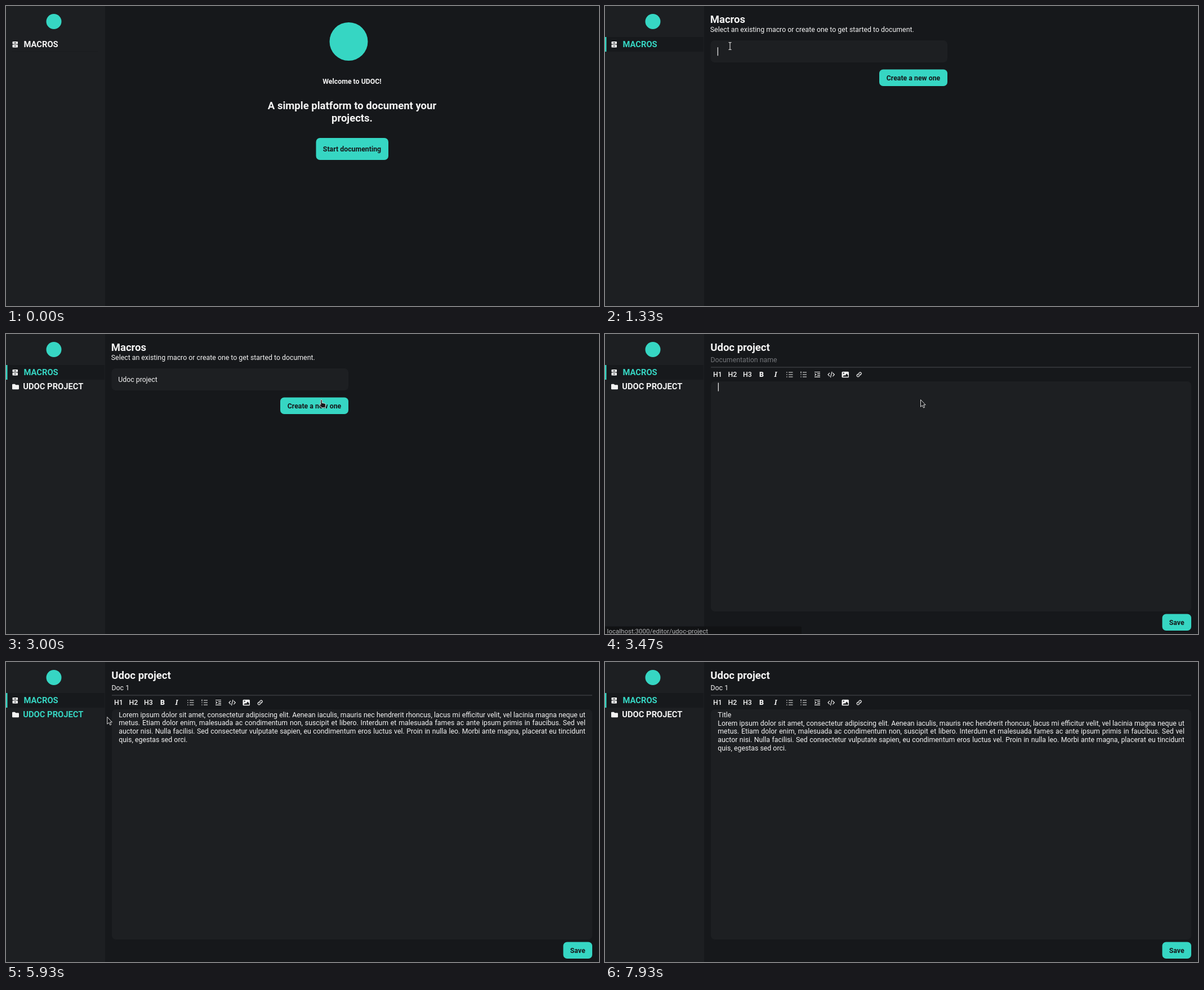
An HTML page for the animation above (8 s loop, 1053x532 px).

```html
<!DOCTYPE html>
<html lang="en">
<head>
<meta charset="utf-8">
<title>Documentation editor</title>
<style>
  :root { --main: #16181b; --panel: #1d1f22; --teal: #36d6c3; }
  html, body { margin: 0; width: 100%; height: 100%; overflow: hidden; background: var(--main); }
  svg { display: block; width: 100vw; height: 100vh; }
  text, .lorem { font: 12.33px Roboto, sans-serif; fill: #f4f4f4; color: #f4f4f4; white-space: pre; }
  .bold { font-weight: 700; }
  .nav { font-weight: 700; font-size: 14.75px; }
  .head { font-weight: 700; font-size: 18.5px; }
  .mid { text-anchor: middle; }
  .teal { fill: var(--teal); }
  .label { font-weight: 700; text-anchor: middle; fill: #16181b; }
  .panel { fill: var(--panel); }
  .hint { fill: #74767a; }
  .tool { text-anchor: middle; font-weight: 500; }
  .line { fill: none; stroke: #f0f0f0; stroke-width: 1.2; }
  .lorem div { white-space: nowrap; line-height: 14.8px; text-align: justify; text-align-last: justify; }
  .lorem div:last-child { text-align-last: left; }
  #status text { font-size: 11.55px; fill: #b4b5b7; }
  .pointer { fill: #17181b; stroke: #dcdcdc; stroke-width: 1; stroke-linejoin: round; }
  #ibeam { fill: none; stroke: #d4d4d4; stroke-width: 1.2; }
</style>
</head>
<body>
<svg viewBox="0 0 1053 532">
  <rect width="1053" height="532" fill="#16181b"/>

  <g id="sidebar">
    <rect class="panel" width="176" height="532"/>
    <circle class="teal" cx="85" cy="27.5" r="13.5"/>
    <path d="M11 80.5H163" stroke="#191b1e"/>
    <g id="active">
      <rect y="55" width="175" height="26" fill="#17191c"/>
      <rect class="teal" y="55" width="2.5" height="26"/>
    </g>
    <g fill="#f4f4f4">
      <rect x="11.5" y="63" width="9.5" height="4.6" rx="1"/>
      <rect x="11.5" y="68.6" width="9.5" height="4.8" rx="1"/>
    </g>
    <path d="M14.5 65.3h3.5M14.5 71h3.5" stroke="#1d1f22" stroke-width="1.2"/>
    <text id="macros" class="nav" x="31.5" y="73.1">MACROS</text>
    <g id="project">
      <path fill="#f4f4f4" d="M12.2 88.7h3.6l1.5 1.6h4.5q1.2 0 1.2 1.2v5.6q0 1.2-1.2 1.2h-9.6q-1.2 0-1.2-1.2v-7.2q0-1.2 1.2-1.2z"/>
      <text id="projectName" class="nav" x="30.3" y="98.3">UDOC PROJECT</text>
    </g>
  </g>

  <g id="welcome">
    <circle class="teal" cx="608.5" cy="63" r="34"/>
    <text class="bold mid" x="614.5" y="138">Welcome to UDOC!</text>
    <text class="head mid" x="614.5" y="183.3">A simple platform to document your</text>
    <text class="head mid" x="614.5" y="205.2">projects.</text>
    <rect class="teal" x="550.5" y="234" width="128.5" height="39" rx="7"/>
    <text class="label" x="614.5" y="258">Start documenting</text>
  </g>

  <g id="create">
    <text class="head" x="186.8" y="29.5">Macros</text>
    <text x="186.8" y="45.7">Select an existing macro or create one to get started to document.</text>
    <rect class="panel" x="187.5" y="61" width="420.5" height="39" rx="7"/>
    <text id="macroInput" x="199.3" y="84.9"></text>
    <rect class="teal" x="487" y="112.5" width="121" height="29.5" rx="7"/>
    <text class="label" x="547.5" y="132.2">Create a new one</text>
  </g>

  <g id="editor">
    <text class="head" x="187.3" y="29.5">Udoc project</text>
    <text id="hint" class="hint" x="187.5" y="50.4">Documentation name</text>
    <text id="docName" x="187.5" y="50.4"></text>
    <path d="M188 59H1041" stroke="#4b4d50"/>
    <text class="tool" x="199.8" y="75.6">H1</text>
    <text class="tool" x="226.3" y="75.6">H2</text>
    <text class="tool" x="253" y="75.6">H3</text>
    <text class="tool" style="font-weight:900" x="278" y="76">B</text>
    <text class="tool" style="font:italic 700 12px 'Noto Serif',serif" x="303" y="76">I</text>
    <g class="line">
      <path d="M326 68h7.5M326 72h7.5M326 76h7.5M322 68h1.8M322 72h1.8M322 76h1.8"/>
      <path d="M351 68h7M351 72h7M351 76h7M348 66.5v3M347.2 72h1.6M347.2 76h1.6"/>
      <path d="M372 67.5h10M377 70.4h5M377 73.3h5M372 76.2h10M372.5 70l2.2 1.9-2.2 1.9"/>
      <path d="M399 68.8l-3 3.2 3 3.2M404.3 68.8l3 3.2-3 3.2M403 66.8l-2.6 10.4"/>
      <path d="M450.2 73.2a2.2 2.2 0 0 1 0-3.1l1.5-1.5a2.2 2.2 0 0 1 3.1 3.1l-1 1M452.2 70.6a2.2 2.2 0 0 1 0 3.1l-1.5 1.5a2.2 2.2 0 0 1-3.1-3.1l1-1"/>
    </g>
    <rect x="420.5" y="66.7" width="12.5" height="10.5" rx="1.5" fill="#f0f0f0"/>
    <circle cx="423.7" cy="69.7" r="1.1" fill="#16181b"/>
    <path d="M422 75.7l2.7-3 1.5 1.3 3-3.7 2.6 3.3v2.1z" fill="#16181b"/>
    <rect class="panel" x="188" y="84" width="853" height="408" rx="7"/>
    <text id="docTitle" x="200.3" y="98.3"></text>
    <foreignObject id="body" x="200.3" y="86.7" width="828.6" height="62">
      <div class="lorem"><div>Lorem ipsum dolor sit amet, consectetur adipiscing elit. Aenean iaculis, mauris nec hendrerit rhoncus, lacus mi efficitur velit, vel lacinia magna neque ut</div><div>metus. Etiam dolor enim, malesuada ac condimentum non, suscipit et libero. Interdum et malesuada fames ac ante ipsum primis in faucibus. Sed vel</div><div>auctor nisi. Nulla facilisi. Sed consectetur vulputate sapien, eu condimentum eros luctus vel. Proin in nulla leo. Morbi ante magna, placerat eu tincidunt</div><div>quis, egestas sed orci.</div></div>
    </foreignObject>
    <rect class="teal" x="989.5" y="496.5" width="51.5" height="29.5" rx="7"/>
    <text class="label" x="1015.2" y="515.8">Save</text>
  </g>

  <rect id="caret" width="1.2" height="15" fill="#f4f4f4"/>

  <g id="status">
    <path id="bubble" fill="#111214"/>
    <text id="address" x="3.6" y="531"></text>
  </g>

  <g id="cursor">
    <path id="arrow" class="pointer" d="M.5.5v12.6l3-2.6 2.2 4.4 2-1-2.1-4.2h3.6z"/>
    <path id="hand" class="pointer" d="M-1.2 1.2q1.2-1.6 2.4 0v5l4.6.9q1.9.4 1.8 2.2l-.7 5.4h-6.5q-2-2.8-4.2-5.6.6-1.7 2.6.2z"/>
    <path id="ibeam" d="M-2.5-6.3h1.7l.8.8.8-.8h1.7M0-5.5v11M-2.5 6.3h1.7l.8-.8.8.8h1.7"/>
  </g>
</svg>
<script>
const LOOP = 8000;
const $ = id => document.getElementById(id);
const clamp = v => Math.min(1, Math.max(0, v));
const ramp = (t, from, to) => clamp((t - from) / (to - from));
const within = (t, from, to) => t >= from && t < to;
const show = (id, on) => $(id).style.display = on ? '' : 'none';

// time, x, y, shape from that time on
const path = [
  [270, 600, 250, 'arrow'], [520, 85, 70, 'hand'], [600, 61, 63, 'hand'],
  [1130, 61, 63, 'arrow'], [1260, 200, 70, 'ibeam'], [1330, 222, 71, 'ibeam'],
  [2330, 222, 71, 'ibeam'], [2450, 310, 86, 'arrow'], [2700, 545, 116, 'hand'],
  [2800, 560, 116, 'hand'], [3330, 560, 116, 'arrow'], [4070, 560, 116, 'arrow'],
  [4260, 330, 55, 'ibeam'], [4330, 293.5, 47, 'ibeam'], [5130, 293.5, 47, 'ibeam'],
  [5400, 322, 98, 'ibeam'], [5600, 322, 98, 'ibeam'], [5860, 192, 97, 'arrow'],
  [5930, 179.5, 97, 'arrow'], [6030, 150, 95, 'hand'], [6270, 115, 92, 'hand'],
  [6470, 115, 92, 'hand']
];

function moveCursor(t) {
  const i = path.findLastIndex(p => p[0] <= t);
  const on = i >= 0 && i < path.length - 1;
  show('cursor', on);
  if (!on) return;
  const [t0, x0, y0, shape] = path[i], [t1, x1, y1] = path[i + 1];
  const k = ramp(t, t0, t1);
  $('cursor').setAttribute('transform', `translate(${x0 + (x1 - x0) * k} ${y0 + (y1 - y0) * k})`);
  for (const s of ['arrow', 'hand', 'ibeam']) show(s, s === shape);
}

function type(id, str, t, times) {
  const text = str.slice(0, times.filter(at => at <= t).length);
  if ($(id).textContent !== text) $(id).textContent = text;
}

function placeCaret(t) {
  const after = id => +$(id).getAttribute('x') + $(id).getComputedTextLength() + .4;
  const spans = [
    [1330, 2330, 'macroInput', 73.2], [3330, 3830, 'docTitle', 86.5],
    [4330, 5330, 'docName', 38.7], [5330, 5600, 'docTitle', 86.5],
    [5600, 5870, 322.5, 131.5], [6470, 7270, 'docTitle', 86.5], [7330, 7830, 'docTitle', 86.5]
  ];
  const span = spans.find(([from, to]) => within(t, from, to));
  show('caret', span);
  if (!span) return;
  const [, , at, y] = span;
  $('caret').setAttribute('x', typeof at === 'number' ? at : after(at));
  $('caret').setAttribute('y', y);
}

function setStatus(t) {
  const first = t < 2000;
  const alpha = first
    ? .6 * ramp(t, 600, 730) * (1 - ramp(t, 1130, 1330))
    : ramp(t, 3200, 3400) * (1 - ramp(t, 3600, 3800));
  $('status').style.opacity = alpha;
  $('bubble').setAttribute('d', `M0 518.5H${first ? 118 : 346}q3 0 3 3V532H0z`);
  $('address').textContent = 'localhost:3000/' + (first ? 'macro' : 'editor/udoc-project');
}

function tint(id, k) {
  const mix = (a, b) => Math.round(a + (b - a) * k);
  $(id).style.fill = `rgb(${mix(244, 54)},${mix(244, 214)},${mix(244, 195)})`;
}

const nameKeys = Array.from('Udoc project', (_, i) => 1470 + 66 * i);

function draw(t) {
  show('welcome', t < 1000);
  show('create', within(t, 1000, 3270));
  show('editor', t >= 3270);
  show('active', t >= 1000);
  show('project', t >= 2930);
  show('hint', t < 4470);
  show('body', t >= 5600);
  $('body').setAttribute('y', t < 6470 ? 86.7 : 101.5);

  type('macroInput', 'Udoc project', t, nameKeys);
  type('docName', 'Doc 1', t, [4470, 4530, 4600, 4670, 4930]);
  type('docTitle', 'Title', t, [6730, 6870, 7000, 7130, 7270]);

  tint('macros', ramp(t, 500, 650));
  tint('projectName', ramp(t, 5800, 5930) * (1 - ramp(t, 7730, 7930)));
  setStatus(t);
  placeCaret(t);
  moveCursor(t);
}

const start = performance.now();
function frame() {
  draw((performance.now() - start) % LOOP);
  requestAnimationFrame(frame);
}
frame();
</script>
</body>
</html>
```
